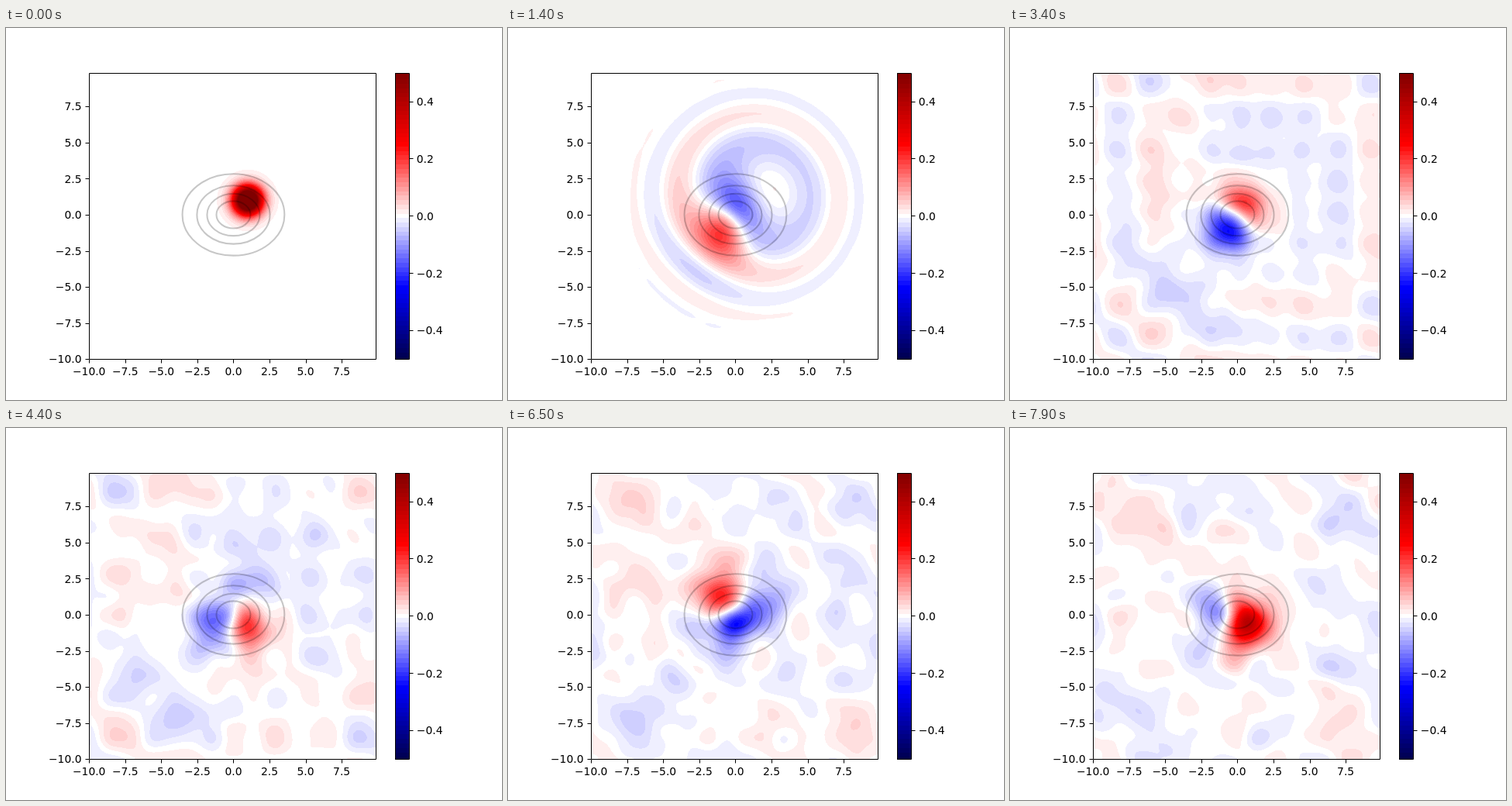
Recreate the animation shown at these times as an HTML page with a canvas. Size 640 by 480 pixels, loop 8 s.

```html
<!DOCTYPE html>
<html>
<head>
<meta charset="utf-8">
<style>
  html, body { margin: 0; width: 640px; height: 480px; overflow: hidden; background: #fff; }
  canvas, svg { position: absolute; left: 0; top: 0; }
  text { font: 13.89px "DejaVu Sans", sans-serif; }
</style>
</head>
<body>
<canvas id="plot" width="640" height="480"></canvas>
<svg id="axes" width="640" height="480" fill="none" stroke="#000"></svg>
<script>
// Wave packet in an elliptic sech² well, split-step Fourier method on a periodic grid.
const N = 128, SIZE = N * N, L = 20, DT = 0.2, DEPTH = 2.5;
const WIDE = 2.45, NARROW = 1.96;
const FRAMES = 80, FRAME_MS = 100;
const LEFT = 107.2, TOP = 57.6, SIDE = 369.6;
const UNIT = SIDE / (L - L / N);
const px = x => LEFT + (x + L / 2) * UNIT;
const py = y => TOP + SIDE - (y + L / 2) * UNIT;

const array = () => new Float64Array(SIZE);
const re = array(), im = array();
const potRe = array(), potIm = array(), kinRe = array(), kinIm = array();
const wave = n => 2 * Math.PI / L * (n < N / 2 ? n : n - N);

for (let j = 0; j < N; j++) for (let i = 0; i < N; i++) {
  const n = j * N + i;
  const x = -L / 2 + i * L / N, y = -L / 2 + j * L / N;
  re[n] = Math.sqrt(2 / Math.PI) * Math.exp(-((x - 1) ** 2) - (y - 1) ** 2);
  const v = DEPTH / Math.cosh(Math.hypot(x / NARROW, y / WIDE)) ** 2 * DT / 2;
  potRe[n] = Math.cos(v);
  potIm[n] = Math.sin(v);
  const k = -(wave(i) ** 2 + wave(j) ** 2) * DT / 2;
  kinRe[n] = Math.cos(k) / SIZE;
  kinIm[n] = Math.sin(k) / SIZE;
}

const cosT = [], sinT = [], flip = [];
for (let i = 0; i < N; i++) {
  cosT.push(Math.cos(2 * Math.PI * i / N));
  sinT.push(-Math.sin(2 * Math.PI * i / N));
  let r = 0;
  for (let b = 1; b < N; b *= 2) r = r * 2 + (i & b ? 1 : 0);
  flip.push(r);
}

const lineRe = new Float64Array(N), lineIm = new Float64Array(N);
function fft(a, b, start, stride) {
  for (let i = 0; i < N; i++) {
    const p = start + flip[i] * stride;
    lineRe[i] = a[p];
    lineIm[i] = b[p];
  }
  for (let half = 1; half < N; half *= 2) {
    const turn = N / (2 * half);
    for (let base = 0; base < N; base += 2 * half) for (let k = 0; k < half; k++) {
      const p = base + k, q = p + half, c = cosT[k * turn], s = sinT[k * turn];
      const tr = lineRe[q] * c - lineIm[q] * s, ti = lineRe[q] * s + lineIm[q] * c;
      lineRe[q] = lineRe[p] - tr;
      lineIm[q] = lineIm[p] - ti;
      lineRe[p] += tr;
      lineIm[p] += ti;
    }
  }
  for (let i = 0; i < N; i++) {
    a[start + i * stride] = lineRe[i];
    b[start + i * stride] = lineIm[i];
  }
}
function fft2(a, b) {
  for (let i = 0; i < N; i++) fft(a, b, i * N, 1);
  for (let i = 0; i < N; i++) fft(a, b, i, N);
}
function multiply(fr, fi) {
  for (let n = 0; n < SIZE; n++) {
    const r = re[n];
    re[n] = r * fr[n] - im[n] * fi[n];
    im[n] = r * fi[n] + im[n] * fr[n];
  }
}
function step() {
  multiply(potRe, potIm);
  fft2(re, im);
  multiply(kinRe, kinIm);
  fft2(im, re); // swapped parts give the inverse
  multiply(potRe, potIm);
}

const fields = [Float32Array.from(re)];
function field(k) {
  while (fields.length <= k) {
    step();
    fields.push(Float32Array.from(re));
  }
  return fields[k];
}

// Blue-white-red map for -0.5..0.5, in 64 steps
function shade(v) {
  v = Math.max(-0.5, Math.min(0.5, Math.round(v * 64) / 64));
  const m = Math.abs(v), pale = Math.max(0, 255 * (1 - 4 * m));
  const dark = m > 0.25 ? (m - 0.25) * 4 : 0;
  return v < 0 ? [pale, pale, 255 * (1 - 0.7 * dark)] : [255 * (1 - 0.5 * dark), pale, pale];
}
const palette = Array.from({ length: 65 }, (_, i) => shade(i / 64 - 0.5));
const color = v => palette[Math.max(0, Math.min(64, Math.round(v * 64) + 32))];

const ctx = document.getElementById("plot").getContext("2d");
const X0 = 108, Y0 = 59, W = 369, H = 368;
const img = ctx.createImageData(W, H);
const clampCell = c => Math.max(0, Math.min(N - 1.001, c));

function draw(f) {
  let o = 0;
  for (let r = 0; r < H; r++) {
    const v = clampCell((TOP + SIDE - Y0 - r - 0.5) / SIDE * N - 0.5);
    const j = Math.floor(v), b = v - j;
    for (let c = 0; c < W; c++) {
      const u = clampCell((X0 + c + 0.5 - LEFT) / SIDE * N - 0.5);
      const i = Math.floor(u), a = u - i, n = j * N + i;
      const low = f[n] + (f[n + 1] - f[n]) * a;
      const high = f[n + N] + (f[n + N + 1] - f[n + N]) * a;
      const rgb = color(low + (high - low) * b);
      img.data[o++] = rgb[0];
      img.data[o++] = rgb[1];
      img.data[o++] = rgb[2];
      img.data[o++] = 255;
    }
  }
  ctx.putImageData(img, X0, Y0);
}

for (let y = 58; y < 428; y++) {
  ctx.fillStyle = `rgb(${color(0.5 - (y + 0.5 - TOP) / SIDE)})`;
  ctx.fillRect(502, y, 18, 1);
}

const snap = v => Math.floor(v + 0.5) + 0.5;
const label = (v, digits) => v.toFixed(digits).replace("-", "\u2212");
const text = (x, y, anchor, s) =>
  `<text x="${x}" y="${y}" text-anchor="${anchor}" fill="#000" stroke="none">${s}</text>`;
let svg = "";
for (let k = 1; k < 5; k++) {
  const r = Math.acosh(Math.sqrt(5 / k)) * UNIT;
  svg += `<ellipse cx="${px(0)}" cy="${py(0)}" rx="${r * WIDE}" ry="${r * NARROW}" stroke-opacity=".22" stroke-width="2.08"/>`;
}
svg += '<path d="M107.5 58.5H477.5V427.5H107.5ZM502.5 58.5H520.5V427.5H502.5Z"/>';
for (let v = -10; v < 10; v += 2.5) {
  const x = px(v), y = py(v), s = label(v, 1);
  svg += `<path d="M${snap(x)} 428v4.5M107 ${snap(y)}h-4.5"/>`;
  svg += text(x, 447.8, "middle", s) + text(97.5, y + 5.2, "end", s);
}
for (let k = -2; k < 3; k++) {
  const y = TOP + SIDE / 2 - k * 0.2 * SIDE;
  svg += `<path d="M521 ${snap(y)}h4.5"/>` + text(529.8, y + 5.2, "start", label(k * 0.2, 1));
}
document.getElementById("axes").innerHTML = svg;

let shown = -1;
function tick() {
  const k = Math.floor(performance.now() / FRAME_MS) % FRAMES;
  if (k !== shown) draw(field(shown = k));
  requestAnimationFrame(tick);
}
tick();
</script>
</body>
</html>
```
